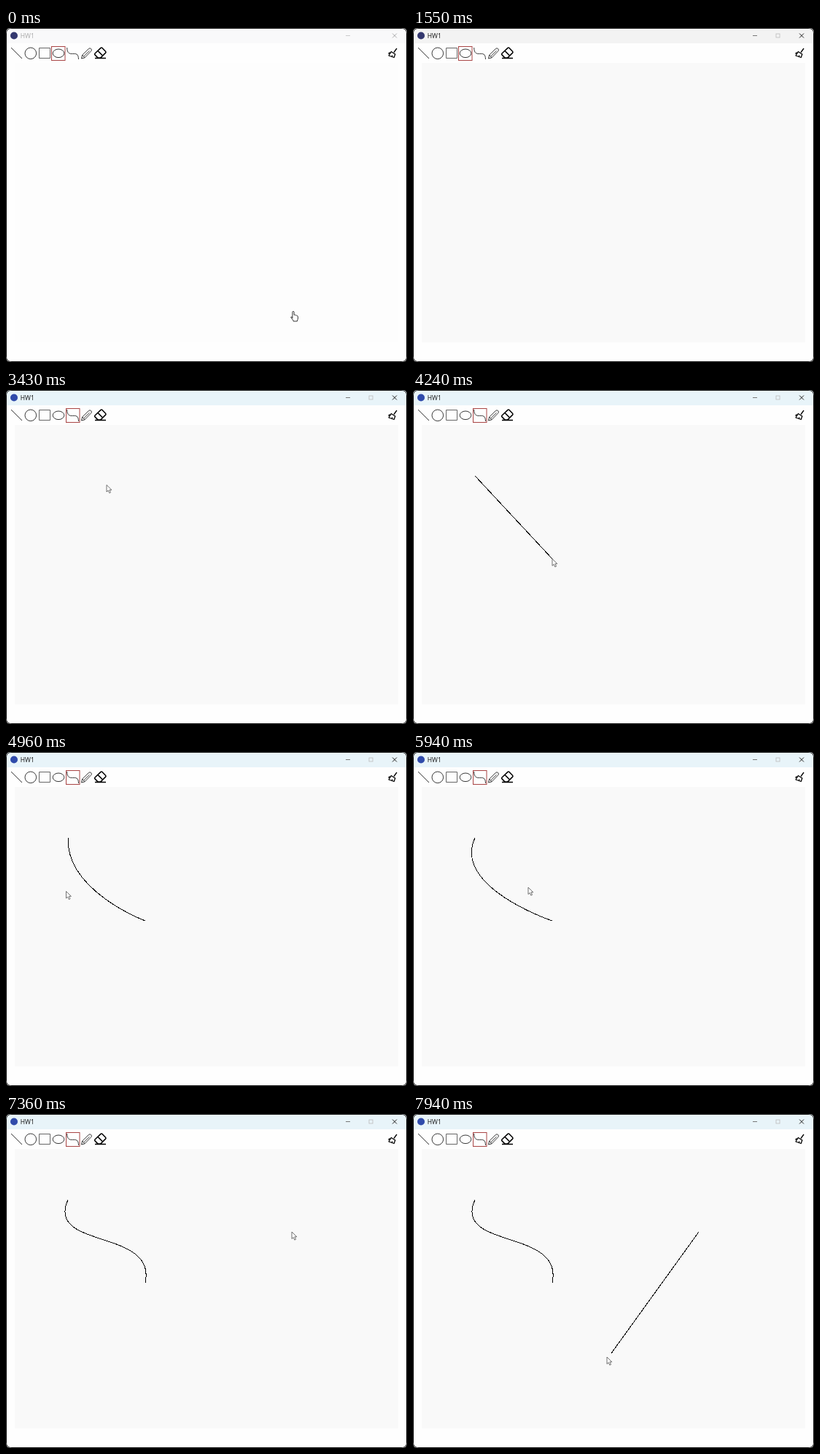
These frames come from a looping animation (550 by 459 pixels, 8000 ms). An HTML page:

```html
<!DOCTYPE html>
<html lang="en">
<head>
<meta charset="utf-8">
<title>HW1</title>
<style>
  html, body { margin: 0; width: 550px; height: 459px; overflow: hidden; background: #000; }
  svg { display: block; }
  text { font: 8.5px "Open Sans", "Noto Sans", sans-serif; fill: #111; }
  #curve, #line { stroke: #000; shape-rendering: crispEdges; }
</style>
</head>
<body>
<svg width="550" height="459" fill="none">
  <clipPath id="frame"><rect width="550" height="459" rx="6"/></clipPath>
  <g clip-path="url(#frame)">
    <rect width="550" height="459" fill="#fefefe"/>
    <rect id="bar" width="550" height="21"/>
    <rect id="paper" x="12" y="48" width="526" height="384"/>
  </g>
  <rect x=".5" y=".5" width="549" height="458" rx="6" stroke="#111"/>
  <circle id="icon" cx="11" cy="10.5" r="5"/>
  <g id="caption">
    <text x="19.8" y="13.8">HW1</text>
    <path d="M466 10.5h6" stroke="#777"/>
    <rect id="maximize" x="498" y="8" width="5" height="5" stroke="#bbb" stroke-width=".8"/>
    <path d="M530 7.5l6 6m0-6l-6 6" stroke="#222"/>
  </g>
  <g stroke="#222" stroke-width=".9" stroke-linejoin="round">
    <path d="M7 27L22 42"/>
    <circle cx="33.8" cy="34.8" r="7.8"/>
    <rect x="45.5" y="27.5" width="15" height="14" stroke="#555"/>
    <ellipse cx="72" cy="34.8" rx="7.8" ry="5.8"/>
    <path d="M83.7 27C84 44 99.3 27 99.5 43"/>
    <path d="M103.5 42l1.2-5 9-8.7q1.4-1.2 2.9.2t.3 3L108 40.8zM104.7 37l3.3 3.8M106.5 39l8-7.8"/>
    <path d="M122 35l8-7.6q1-.9 2 0l4.6 4.8q.9 1 0 1.9l-7 7h-3.4l-4.2-4.2q-.9-1 0-1.9zM126 31.4l6.8 6.8M122 41.5h15" stroke="#000" stroke-width="1.5"/>
    <path d="M536 28l-4 5.5M528.3 32.5l5.5 3.5-1.6 4.5-7.2-2.5zM529 40l1-2.5M524.5 35.5l2-2" stroke="#000" stroke-width="1.3"/>
  </g>
  <rect id="pick" y="25.5" width="18.5" height="19" stroke="#a84444"/>
  <path id="curve"/>
  <path id="line"/>
  <path id="arrow" d="M0 0v9.5l2.2-2 1.6 3.6 1.7-.8L3.9 6.8h3z" fill="#fff" stroke="#444" stroke-width=".75"/>
  <path id="hand" transform="translate(394.5 396)" d="M-1.6 3V-5.4q0-1.2 1.1-1.2T.6-5.4V-1.7q2-.6 2.2.5 1.6-.2 1.8.7 1.3 0 1.3 1.2V3q0 1.6-1 3V7H-.4V6L-3.9 1.5q0-1.4 2.3.3" fill="#fff" stroke="#222" stroke-width=".9"/>
</svg>
<script>
const $ = id => document.getElementById(id);
const set = (id, attrs) => {
  for (const k in attrs) $(id).setAttribute(k, attrs[k]);
};
const show = (id, on) => set(id, { visibility: on ? "visible" : "hidden" });

const LOOP = 8000, MOVE = 500;
const start = [85, 118], lineStart = [392, 162];

// Pointer stops: arrival time and place.
const stops = [
  [1600, [300, 440]], [2280, [153.5, 118.5]], [2680, [92, 37]],
  [3430, [138, 130.5]], [3560, start], [4240, [191, 232]],
  [4960, [82.5, 191.5]], [5160, [54, 186]], [5700, [158, 186]],
  [6580, [207, 157]], [7360, lineStart], [7940, [266, 334]]
];

// Rest at each stop, then ease to the next one within MOVE.
function pointer(t) {
  const i = Math.max(1, stops.findIndex(s => s[0] >= t));
  const [from, a] = stops[i - 1], [to, b] = stops[i];
  const begin = Math.max(from, to - MOVE);
  const k = Math.max(0, (t - begin) / (to - begin));
  const e = k * k * (3 - 2 * k);
  return a.map((v, j) => v + (b[j] - v) * e);
}

// Follow the pointer until it arrives at the given time.
const dragged = (t, arrival, before) =>
  t < arrival - MOVE ? before : pointer(Math.min(t, arrival));

function draw(now) {
  const clock = now % LOOP, t = Math.min(clock, 7940);
  const active = t >= 1850, fade = Math.min(1, t / 500);

  set("bar", { fill: active ? "#e8f4f9" : t < 170 ? "#f9f9fa" : "#f3f3f3" });
  set("paper", { fill: t < 170 ? "#fdfdfd" : "#f9f9f9" });
  set("icon", { fill: active ? "#304bab" : "#34386f" });
  set("caption", { opacity: .35 + .65 * fade });
  set("maximize", { opacity: fade });
  set("pick", { x: t < 2880 ? 62.5 : 82.5 });
  set("arrow", { transform: `translate(${pointer(t)})` });
  show("hand", t < 500);
  show("arrow", t >= 1600);

  // Drag out the end, then bend one control point at a time.
  const end = dragged(t, 4240, start);
  const c1 = dragged(t, 5160, start), c2 = dragged(t, 6580, end);
  set("curve", { d: `M${start}C${t < 4460 ? start : c1} ${c2} ${end}` });
  show("curve", t > 3740);

  // The line trails slightly behind the pointer's tip.
  const k = Math.max(0, (t - 7440) / MOVE), e = k * k * (3 - 2 * k);
  set("line", { d: `M${lineStart}l${-120.5 * e} ${167.5 * e}` });
  show("line", k > 0);
}

function tick(now) {
  draw(now);
  requestAnimationFrame(() => tick(performance.now() - origin));
}
const origin = performance.now();
tick(0);
</script>
</body>
</html>
```
